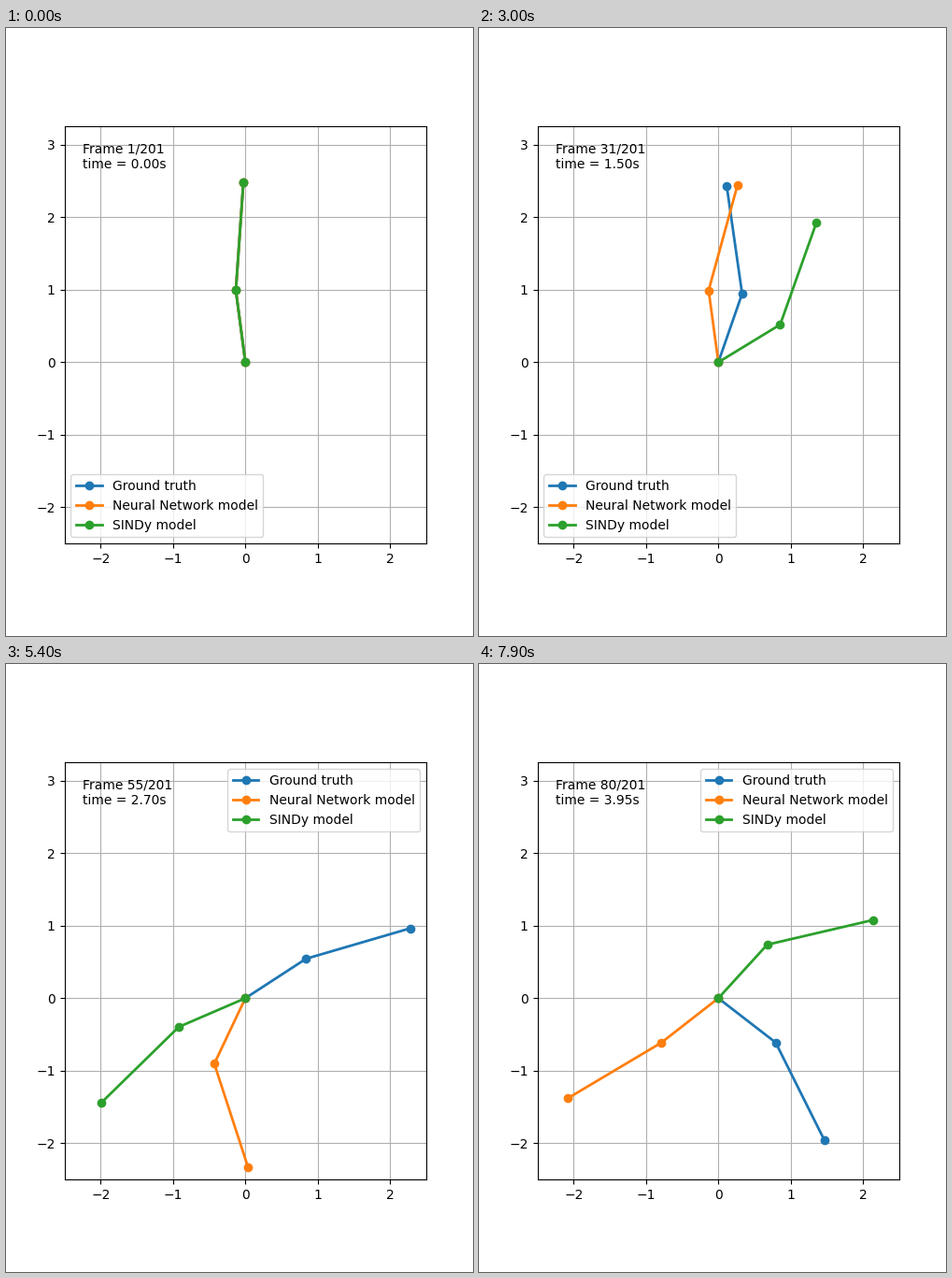
A matplotlib script for the animation above (8000 ms loop, 500x650 px).

```python
import matplotlib.pyplot as plt
import numpy as np
from matplotlib.animation import FuncAnimation

FRAMES, DT = 80, 0.05
L1, L2, G, MU = 1.0, 1.5, 9.81, 1.0   # MU: mass ratio m2 / m1
SUB = 2                               # solver steps per frame
H = DT / SUB

# Waypoints (upper, lower rod angle from the downward vertical); physics fills the rest.
# All arms share the first swing, then drift apart.
STEPS = np.array([0, 10, 18, 30, 44, 54, 70, 79])
FIRST_SWING = [(3.273, 3.072), (4.54, 5.324), (6.98, 6.98)]
LATER = {
    "Ground truth":
        [(9.09, 9.567), (12.0, 12.145), (14.713, 14.421), (17.117, 17.287), (19.763, 19.313)],
    "Neural Network model":
        [(9.559, 9.157), (11.515, 7.09), (12.123, 6.599), (12.33, 4.894), (11.657, 5.248)],
    "SINDy model":
        [(8.4, 9.083), (9.545, 10.367), (11.402, 11.769), (14.106, 14.504), (14.968, 14.366)],
}


def residual(th, k):
    """Violation of the equations of motion; k blends from free motion to full physics."""
    acc = (th[..., 2:, :] - 2 * th[..., 1:-1, :] + th[..., :-2, :]) / H**2
    vel = (th[..., 2:, :] - th[..., :-2, :]) / (2 * H)
    (t1, t2), (a1, a2), (w1, w2) = (
        np.moveaxis(v, -1, 0) for v in (th[..., 1:-1, :], acc, vel))
    c, s = np.cos(t1 - t2), np.sin(t1 - t2)
    r1 = (1 + MU) * (L1 * a1 + k * G * np.sin(t1)) + k * MU * L2 * (a2 * c + w2**2 * s)
    r2 = L2 * a2 + k * (L1 * (a1 * c - w1**2 * s) + G * np.sin(t2))
    return np.concatenate([r1, r2], axis=-1)


def solve_path(poses):
    """Pendulum motion through the given poses (damped least squares)."""
    n = (FRAMES - 1) * SUB + 1
    grid = np.arange(n) / SUB
    th = np.stack([np.interp(grid, STEPS, a) for a in np.transpose(poses)], axis=1)
    free = np.ones_like(th, dtype=bool)
    free[STEPS * SUB] = False
    idx = np.flatnonzero(free)
    rows = np.arange(idx.size)
    eps = 1e-6
    for k in np.linspace(0, 1, 6):
        lam = 1e-9
        for _ in range(14 if k == 1 else 6):
            r = residual(th, k)
            trial = np.tile(th.ravel(), (idx.size, 1))
            trial[rows, idx] += eps
            jac = (residual(trial.reshape(-1, n, 2), k) - r) / eps
            normal, grad = jac @ jac.T, jac @ r
            for _ in range(8):
                damped = normal + lam * np.diag(np.diag(normal))
                new = th.copy()
                new.flat[idx] -= np.linalg.solve(damped, grad)
                if np.sum(residual(new, k)**2) < np.sum(r**2):
                    break
                lam *= 10
            else:
                break
            done = np.abs(new - th).max() < 1e-5
            th, lam = new, max(lam / 10, 1e-10)
            if done:
                break
    return th[::SUB]


def joints(angles):
    x = np.cumsum([0, *(np.array([L1, L2]) * np.sin(angles))])
    y = np.cumsum([0, *(np.array([-L1, -L2]) * np.cos(angles))])
    return x, y


paths = [solve_path(FIRST_SWING + poses) for poses in LATER.values()]

fig, ax = plt.subplots(figsize=(5, 6.5), dpi=100)
ax.set(xlim=(-2.5, 2.5), ylim=(-2.5, 3.25), aspect="equal",
       xticks=range(-2, 3), yticks=range(-2, 4))
ax.grid()
lines = [ax.plot([], [], "o-", lw=2, label=name)[0] for name in LATER]
ax.legend(loc="best")

# The caption sits in its own layer so that legend placement ignores it
layer = ax.inset_axes([0, 0, 1, 1], zorder=3)
layer.axis("off")
caption = layer.text(0.05, 0.9, "")


def update(i):
    for line, path in zip(lines, paths):
        line.set_data(*joints(path[i]))
    caption.set_text(f"Frame {i + 1}/201\ntime = {i * DT:.2f}s")
    return [*lines, caption]


anim = FuncAnimation(fig, update, frames=FRAMES, interval=100,
                     repeat=True, repeat_delay=0, blit=False)
plt.show()
```
